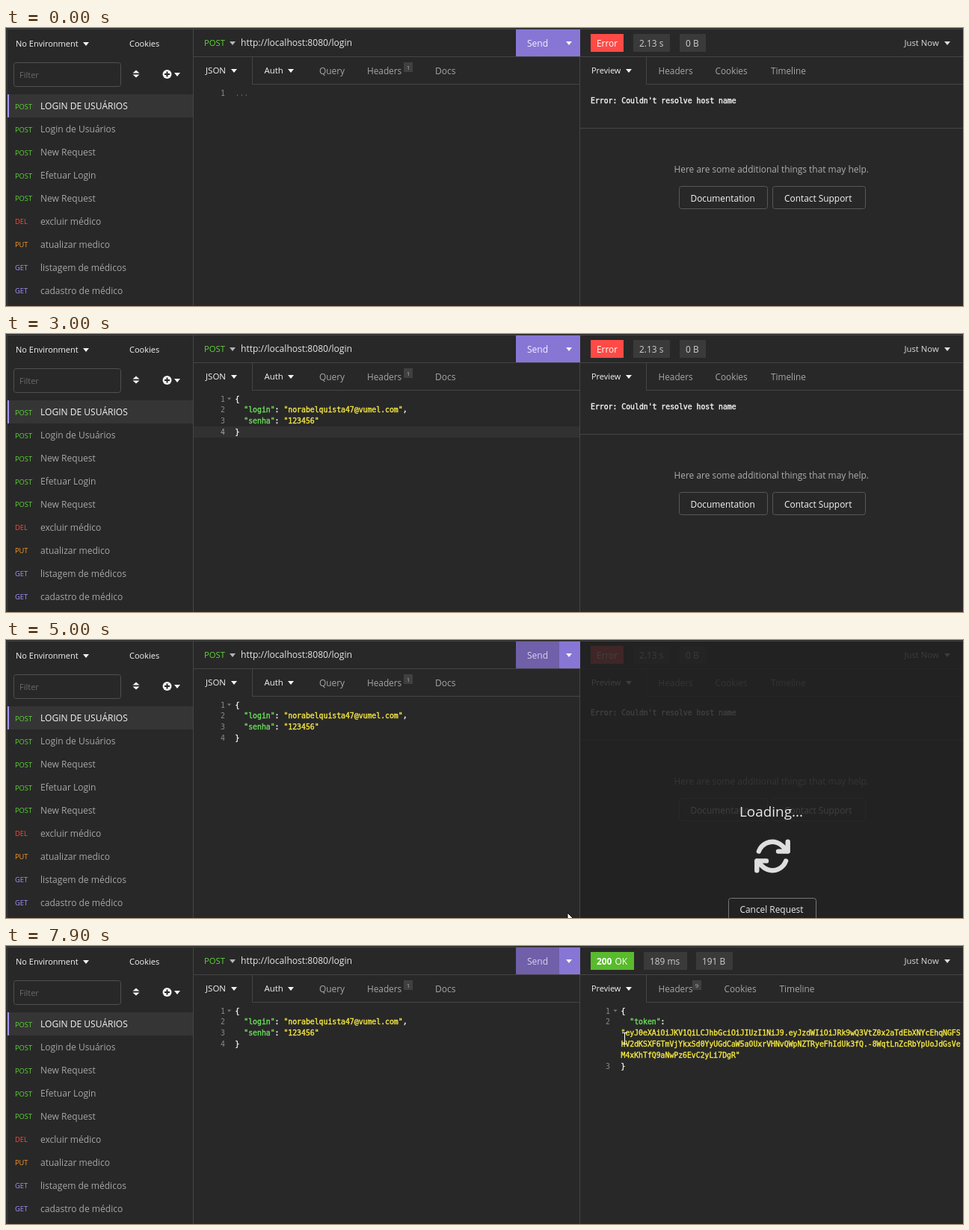
Animation, 1280 px wide and 373 px high, one loop 8 s. Source, as an HTML page with a canvas:

```html
<!DOCTYPE html>
<html lang="pt">
<head>
<meta charset="utf-8">
<title>API client login</title>
<style>
  html, body { margin: 0; width: 100%; height: 100%; overflow: hidden; background: #282828; }
  canvas { display: block; }
</style>
</head>
<body>
<canvas id="stage" width="1280" height="373"></canvas>
<script>
const ctx = document.getElementById('stage').getContext('2d');
const LOOP = 8000, STEP = 100;
const UI = '"Open Sans", "Noto Sans", sans-serif';
const MONO = '"DejaVu Sans Mono", monospace';
const CHAR = 5.9, LINE_H = 14.9;

const C = {
  bg: '#282828', line: '#454545', row: '#353535', chip: '#3a3a3a', active: '#313131',
  white: '#f4f4f4', grey: '#a6a6a6', purple: '#8876d5', green: '#5fd638',
  red: '#ff4a46', orange: '#ff9a24', violet: '#a594ff', yellow: '#f4e742', key: '#6bdc5c'
};

// State changes, in ms
const T = { focus: 1800, paste: 2200, fold: 3000, hover: 3700, send: 3800,
            veil: 4100, load: 4200, reply: 5200 };

const REQUESTS = [
  ['POST', 'LOGIN DE USUÁRIOS'], ['POST', 'Login de Usuários'], ['POST', 'New Request'],
  ['POST', 'Efetuar Login'], ['POST', 'New Request'], ['DEL', 'excluir médico'],
  ['PUT', 'atualizar medico'], ['GET', 'listagem de médicos'], ['GET', 'cadastro de médico']
];
const VERB = { POST: C.green, DEL: '#ff4d35', PUT: C.orange, GET: C.violet };

const TOKEN = [
  '"eyJ0eXAiOiJKV1QiLCJhbGciOiJIUzI1NiJ9.eyJzdWIiOiJRk9wQ3VtZ0x2aTdEbXNYcEhqNGFS',
  'hV2dKSXF6TmVjYkxSd0YyUGdCaW5aOUxrVHNvQWpNZTRyeFhIdUk3fQ.-8WqtLnZcRbYpUoJdGsVe',
  'M4xKhTfQ9aNwPz6EvC2yLi7DgR"'
];

// Pointer path: time, x, y, shape
const PATH = [
  [0, 0, 0, ''], [400, 318, 2, 'beam'], [700, 343, 24, 'beam'], [1000, 350, 215, 'beam'],
  [1200, 332, 134, 'beam'], [1300, 308, 87, 'beam'], [1400, 323, 100, 'beam'],
  [1500, 323, 100, 'beam'], [1600, 323, 90, 'beam'], [1700, 323, 90, 'beam'],
  [1800, 320, 88, 'beam'], [2100, 320, 88, 'beam'], [2200, 0, 0, ''],
  [3200, 440, 245, 'beam'], [3500, 705, 56, 'beam'], [3600, 705, 56, 'beam'],
  [3700, 732, 13, 'hand'], [4300, 732, 13, 'hand'], [4400, 733, 26, 'hand'],
  [4500, 736, 70, 'arrow'], [5000, 751, 366, 'arrow'], [5600, 751, 366, 'arrow'],
  [5700, 862, 290, 'arrow'], [5800, 868, 190, 'arrow'], [5900, 850, 100, 'beam'],
  [6000, 830, 125, 'beam'], [6100, 830, 125, 'beam'], [6400, 764, 131, 'beam'],
  [6600, 816, 119, 'beam'], [6700, 816, 119, 'beam'], [7200, 850, 258, 'beam'],
  [7600, 873, 151, 'beam'], [7900, 827, 124, 'beam']
];

function rect(x, y, w, h, color) {
  ctx.fillStyle = color;
  ctx.fillRect(x, y, w, h);
}

function text(str, x, y, color = C.white, size = 12, weight = 400) {
  ctx.font = `${weight} ${size}px ${UI}`;
  ctx.fillStyle = color;
  ctx.fillText(str, x, y);
}

// A thin stroke gives a weight between regular and bold
function code(str, x, y, color = C.white, boost = 0.4) {
  ctx.font = `9.8px ${MONO}`;
  ctx.fillStyle = ctx.strokeStyle = color;
  ctx.fillText(str, x, y);
  if (!boost) return;
  ctx.lineWidth = boost;
  ctx.strokeText(str, x, y);
}

function poly(points, color, outline) {
  ctx.beginPath();
  points.forEach(([x, y]) => ctx.lineTo(x, y));
  ctx.closePath();
  ctx.fillStyle = color;
  ctx.fill();
  if (outline) {
    ctx.strokeStyle = outline;
    ctx.lineWidth = 1;
    ctx.stroke();
  }
}

// Small triangle; h < 0 points up
function tri(x, y, color = C.white, w = 8, h = 5) {
  poly([[x - w / 2, y - h / 2], [x + w / 2, y - h / 2], [x, y + h / 2]], color);
}

function frame(x, y, w, h, color = '#585858') {
  ctx.beginPath();
  ctx.roundRect(x + 0.5, y + 0.5, w, h, 3);
  ctx.strokeStyle = color;
  ctx.lineWidth = 1;
  ctx.stroke();
}

function chip(x, w, label, color = C.chip, ink = '#cfcfcf') {
  rect(x, 8, w, 24, color);
  text(label, x + 8, 24.5, ink, 11.9);
}

function count(x, n) {
  rect(x, 46, 12, 13, '#404040');
  text(n, x + 3.7, 56, '#b0b0b0', 8);
}

function sidebar() {
  text('No Environment', 13, 25, C.white, 11);
  tri(107, 21.5);
  text('Cookies', 165, 25, C.white, 11);
  frame(10, 46, 143, 32, '#505050');
  text('Filter', 18, 66.5, '#6a6a6a', 11);
  tri(174, 58.5, C.white, 9, -4);
  tri(174, 64.5, C.white, 9, 4);
  ctx.beginPath();
  ctx.arc(215.5, 62, 6, 0, 7);
  ctx.fillStyle = C.white;
  ctx.fill();
  rect(212, 61, 7, 2, C.bg);
  rect(214.5, 58.5, 2, 7, C.bg);
  tri(229, 62.5);

  rect(2, 89, 248, 31, C.row);
  rect(2, 89, 2, 31, C.violet);
  REQUESTS.forEach(([verb, name], i) => {
    const y = 109.4 + 30.9 * i;
    text(verb, 12, y - 0.6, VERB[verb], 9.3);
    text(name, 46, y, i ? C.grey : C.white, 12.05);
  });
}

function lineNo(n, right, y, color = '#8a8a8a') {
  code(n, right - CHAR, y, color, 0);
}

function sendButton(t) {
  const color = t < T.hover ? C.purple : t < T.send ? '#7c6abd' : '#705fa9';
  rect(682, 2, 86, 36, C.purple);
  rect(682, 2, 58, 36, color);
  text('Send', 697, 24.5, t < T.hover ? '#f4f2ff' : '#d9d3f0', 12);
  tri(753, 20.5);
}

function request(t) {
  text('POST', 265, 24.3, C.green, 11.3);
  tri(303, 20.5, '#b5b5b5');
  text('http://localhost:8080/login', 314, 24.3, '#e6e6e6', 12.1);

  text('JSON', 267, 61, C.white, 11.5);
  tri(305, 57.5);
  text('Auth', 345.5, 61, C.white, 11.4);
  tri(381, 57.5);
  text('Query', 419, 62, C.grey, 11.9);
  text('Headers', 483, 62, C.grey, 11.8);
  count(532, '1');
  text('Docs', 574, 62, C.grey, 12);

  const focused = t >= T.focus && t < T.send;
  const pasted = t >= T.paste;
  const y0 = 90.5, x0 = 306.5;
  if (focused) rect(251, pasted ? 124 : 79, 516, 15, C.active);
  if (!pasted) {
    lineNo('1', 293, y0, focused ? '#7f9fb8' : '#8a8a8a');
    code('...', x0, y0, '#6a6a6a', 0);
    if (focused) rect(306, 80, 1, 14, C.white);
    return;
  }
  for (let i = 0; i < 4; i++) {
    lineNo(String(i + 1), 293, y0 + LINE_H * i, focused && i === 3 ? '#9aa8b4' : '#8a8a8a');
  }
  if (t >= T.fold) tri(298.5, 87, '#777', 5, 3);
  code('{', x0, y0);
  pair('"login"', '"norabelquista47@vumel.com"', ',', x0, y0 + LINE_H);
  pair('"senha"', '"123456"', '', x0, y0 + LINE_H * 2);
  code('}', x0, y0 + LINE_H * 3);
  const caretOn = Math.floor((t - T.paste) / 530) % 2 === 0;
  if (focused && caretOn) rect(312, 124, 1, 15, C.white);
}

function pair(key, value, end, x, y) {
  x += 2 * CHAR;
  code(key, x, y, C.key);
  code(':', x + key.length * CHAR, y);
  x += (key.length + 2) * CHAR;
  code(value, x, y, C.yellow);
  code(end, x + value.length * CHAR, y);
}

function responseTabs(cookiesX, timelineX) {
  text('Just Now', 1201.5, 24.3, '#dcdcdc', 11.3);
  tri(1259, 20.5, '#dcdcdc');
  text('Preview', 783, 61, C.white, 10.9);
  tri(833, 57.5);
  text('Headers', 872.5, 62, C.grey, 11.8);
  text('Cookies', cookiesX, 62, C.grey, 11.8);
  text('Timeline', timelineX, 62, C.grey, 11.8);
}

function errorResponse() {
  chip(782, 44, 'Error', C.red, '#fff');
  chip(839, 49, '2.13 s');
  chip(901, 35, '0 B');
  responseTabs(948.5, 1023);
  code("Error: Couldn't resolve host name", 782, 101);
  rect(768, 134, 512, 1, C.line);
  text('Here are some additional things that may help.', 893.5, 194, '#adadad', 11.93);
  frame(900, 212, 118, 30);
  text('Documentation', 915.5, 233, C.white, 11.9);
  frame(1025, 212, 124, 30);
  text('Contact Support', 1041, 233, C.white, 11.9);
}

function okResponse() {
  chip(782, 58, '', '#59bb2c');
  text('200', 790, 24.5, '#fff', 11.9, 700);
  text('OK', 814.5, 24.5, '#fff', 11.9);
  chip(853, 58, '189 ms');
  chip(923, 49, '191 B');
  responseTabs(960.5, 1034.5);
  count(918, '9');

  const x = 822.5, y = 90.5;
  lineNo('1', 808, y);
  lineNo('2', 808, y + LINE_H);
  lineNo('3', 808, y + LINE_H * 5);
  tri(815, 87, '#777', 5, 3);
  code('{', x, y);
  code('"token"', x + 2 * CHAR, y + LINE_H, C.key);
  code(':', x + 9 * CHAR, y + LINE_H);
  TOKEN.forEach((part, i) => code(part, x, y + LINE_H * (2 + i), C.yellow));
  code('}', x, y + LINE_H * 5);
}

function spinner(angle) {
  ctx.save();
  ctx.translate(1025, 290);
  ctx.rotate(angle);
  ctx.strokeStyle = '#dedede';
  ctx.lineWidth = 6.4;
  ctx.lineCap = ctx.lineJoin = 'round';
  for (let i = 0; i < 2; i++) {
    ctx.beginPath();
    ctx.arc(0, 0, 19.2, Math.PI * 1.11, Math.PI * 1.75);
    ctx.lineTo(20.7, -6.4);
    ctx.moveTo(8, -6.4);
    ctx.lineTo(20.7, -6.4);
    ctx.lineTo(20.7, -19.2);
    ctx.stroke();
    ctx.rotate(Math.PI);
  }
  ctx.restore();
}

function loading(t) {
  const full = t >= T.load;
  rect(768, 2, 512, 371, `rgba(33, 33, 33, ${full ? 0.86 : 0.4})`);
  ctx.globalAlpha = full ? 1 : 0.45;
  text('Loading...', 981, 237, '#eaeaea', 18.9);
  const spin = Math.min(t, 5000);
  spinner((spin - 5000) / 1000 * Math.PI);
  frame(966, 346, 117, 32, '#777');
  text('Cancel Request', 981.5, 366, '#eaeaea', 11.9);
  ctx.globalAlpha = 1;
}

function borders() {
  rect(0, 1, 1280, 1, C.line);
  rect(1, 1, 1, 372, '#3c3c3c');
  rect(250, 1, 1, 372, C.line);
  rect(251, 38, 1029, 1, C.line);
  rect(329, 38, 1, 37, C.line);
  rect(329, 75, 438, 1, C.line);
  rect(856, 38, 1, 37, C.line);
  rect(856, 75, 424, 1, C.line);
}

const SHAPES = {
  beam() {
    ctx.strokeStyle = '#fff';
    ctx.lineWidth = 1;
    ctx.beginPath();
    for (const s of [-1, 1]) {
      ctx.moveTo(-3, 7.5 * s);
      ctx.lineTo(4, 7.5 * s);
    }
    ctx.moveTo(0.5, -7);
    ctx.lineTo(0.5, 7);
    ctx.stroke();
  },
  arrow() {
    poly([[0, 0], [0, 16], [4, 12.5], [6.5, 18], [9, 17], [6.5, 11.5], [11.5, 11.5]], '#fff', '#111');
  },
  hand() {
    poly([[-2, 1], [0, 0], [1.5, 1], [2, 6], [5, 6.5], [8, 7.5], [10, 9], [10, 14],
          [8, 18], [8, 21], [-1, 21], [-2, 17], [-6, 12], [-6, 10], [-4, 10], [-2, 12]], '#fff', '#111');
    rect(2, 8, 1, 4, '#444');
    rect(5, 9, 1, 3, '#444');
  }
};

function pointer(t) {
  let i = PATH.length - 1;
  while (PATH[i][0] > t) i--;
  const [t0, x0, y0, shape] = PATH[i];
  if (!shape) return;
  const next = PATH[i + 1];
  const [t1, x1, y1] = next && next[3] ? next : [t0 + 1, x0, y0];
  const k = (t - t0) / (t1 - t0);
  const at = (a, b) => Math.round(a + (b - a) * k);
  ctx.save();
  ctx.translate(at(x0, x1), at(y0, y1));
  SHAPES[shape]();
  ctx.restore();
}

function draw(now) {
  const t = Math.floor(now % LOOP / STEP) * STEP;
  rect(0, 0, 1280, 373, C.bg);
  sidebar();
  request(t);
  borders();
  if (t < T.reply) errorResponse();
  else okResponse();
  if (t >= T.veil && t < T.reply) loading(t);
  rect(767, 1, 1, 372, C.line);
  sendButton(t);
  pointer(t);
}

const start = performance.now();
function tick() {
  draw(performance.now() - start);
  requestAnimationFrame(tick);
}
tick();
</script>
</body>
</html>
```
